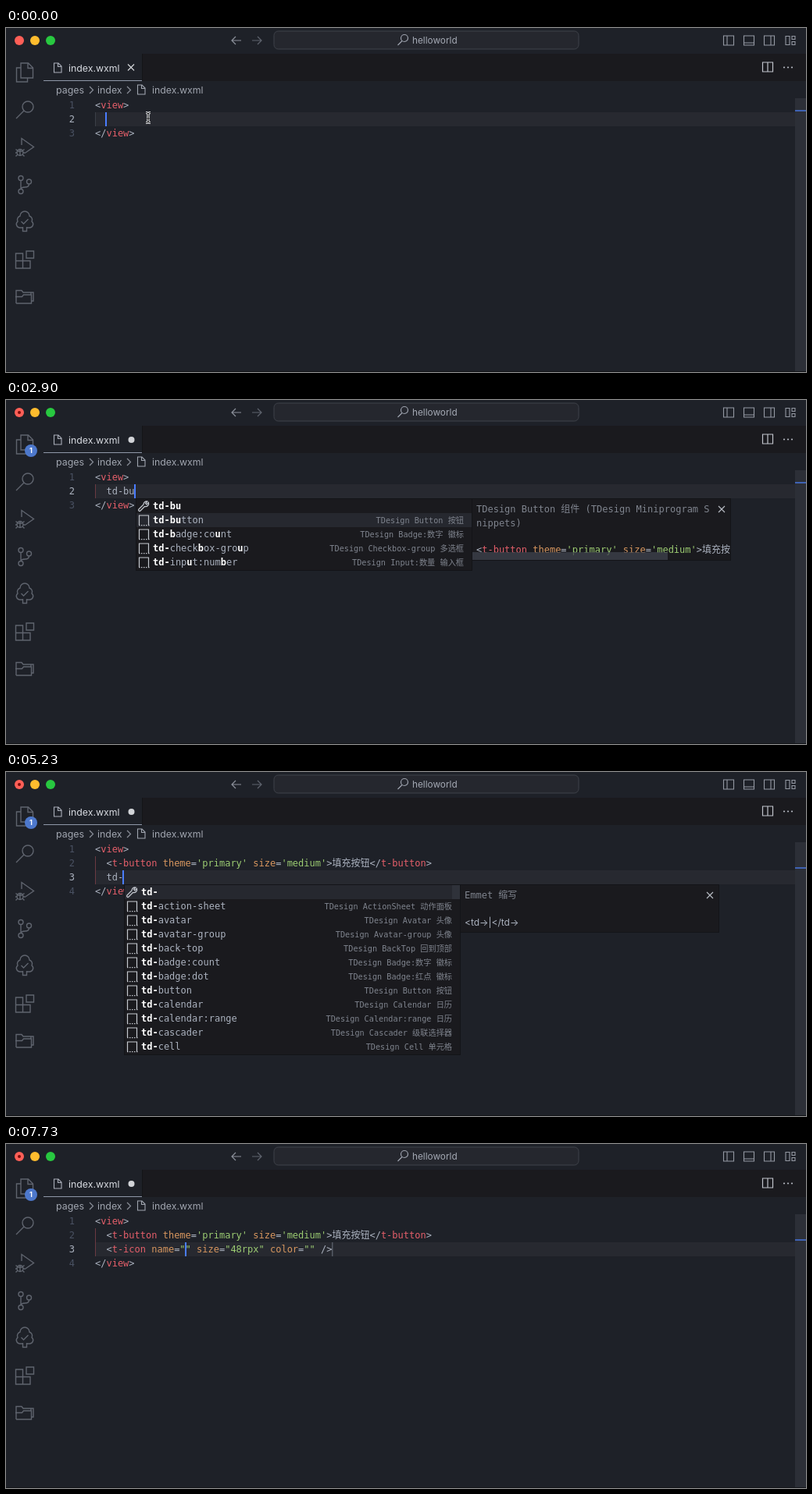
These frames come from a looping animation (1024 by 441 pixels, 7760 ms). An HTML page with a canvas:

```html
<!DOCTYPE html>
<html lang="en">
<head>
<meta charset="utf-8">
<title>Snippet completion</title>
<style>
  html, body { margin: 0; width: 100%; height: 100%; overflow: hidden; background: #1e2128; }
  canvas { display: block; }
</style>
</head>
<body>
<canvas id="stage" width="1024" height="441"></canvas>
<script>
const ctx = document.getElementById('stage').getContext('2d');
const LOOP = 7760, ROW = 18, LEFT = 114, TOP = 90;
const MONO = '"DejaVu Sans Mono", "Noto Sans CJK SC", "Noto Sans CJK", monospace';
const UI = 'Inter, "Noto Sans CJK SC", sans-serif';
const CODE = '12px ' + MONO;
const C = {
  bg: '#1e2128', dark: '#1a1a1e', line: '#272930', edge: '#131418', text: '#abb2bf', dim: '#7f848e',
  icon: '#5f646e', tag: '#e55f6a', attr: '#d8975f', string: '#9ccc72', cursor: '#4a7dff', blue: '#4d78cc'
};

// Completion rows: "label after td-|detail"; stars toggle the matched letters.
const ALL = ['action-sheet|ActionSheet 动作面板', 'avatar|Avatar 头像', 'avatar-group|Avatar-group 头像',
  'back-top|BackTop 回到顶部', 'badge:count|Badge:数字 徽标', 'badge:dot|Badge:红点 徽标', 'button|Button 按钮',
  'calendar|Calendar 日历', 'calendar:range|Calendar:range 日历', 'cascader|Cascader 级联选择器', 'cell|Cell 单元格'];
const notice = mark => ['|NoticeBar 公告栏', ':close|NoticeBar:close 公告栏', ':horizontal|NoticeBar:horizontal 公…',
  ':theme|NoticeBar:theme 公告栏', ':vertical|NoticeBar:vertical 公告栏'].map(s => mark + s);
const LISTS = {
  't': ALL, 'td': ALL, 'td-': ALL,
  'td-b': ['*b*ack-top|BackTop 回到顶部', '*b*adge:count|Badge:数字 徽标', '*b*adge:dot|Badge:红点 徽标',
    '*b*utton|Button 按钮', 'tab-*b*ar|TabBar 标签栏', 'side-*b*ar|SideBar 侧边栏', ...notice('notice-*b*ar')],
  'td-bu': ['*bu*tton|Button 按钮', '*b*adge:co*u*nt|Badge:数字 徽标',
    'check*b*ox-gro*u*p|Checkbox-group 多选框', 'inp*u*t:num*b*er|Input:数量 输入框'],
  'td-i': ['*i*con|Icon 图标', '*i*mage|Image 图片', '*i*mage-viewer|ImageViewer 图片预览', '*i*ndexes|Indexes 索引',
    '*i*nput|Input 输入框', '*i*nput:code|Input:验证码 输入框', '*i*nput:number|Input:数量 输入框',
    '*i*nput:price|Input:价格 输入框', 'p*i*cker|Picker 选择器', 's*i*de-bar|SideBar 侧边栏', 'st*i*cky|Sticky 吸顶'],
  'td-ic': ['*ic*on|Icon 图标', '*i*nput:*c*ode|Input:验证码 输入框', 'p*ic*ker|Picker 选择器', 'st*ic*ky|Sticky 吸顶',
    '*i*nput:pri*c*e|Input:价格 输入框', ...notice('not*ic*e-bar'), '*c*ell:sw*i*tch|Cell:switch 单元格']
};
const SLIDER = { 't': 18, 'td': 18, 'td-': 18, 'td-i': 54, 'td-ic': 77 };

const BUTTON = "<t-button theme='primary' size='medium'>填充按钮</t-button>";
const ICON = '<t-icon name="" size="48rpx" color="" />';
const DOCS = {
  'td-bu': ['TDesign Button 组件 (TDesign Miniprogram S', 'nippets)', BUTTON],
  'td-ic': ['TDesign Icon 组件 (TDesign Miniprogram Sni', 'ppets)', ICON]
};

// Each step: start time, body lines, typed word, selected row.
const steps = [
  [0, ['']],
  ...[[560, 't'], [860, 'td'], [1090, 'td-'], [1350, 'td-b'], [1850, 'td-bu']].map(([t, w]) => [t, [w], w, 0]),
  [2600, ['td-bu'], 'td-bu', 1],
  [3050, [BUTTON]],
  [3500, [BUTTON, '']],
  ...[[4600, 't'], [4850, 'td'], [5050, 'td-'], [5450, 'td-i'], [5690, 'td-ic']].map(([t, w]) => [t, [BUTTON, w], w, 0]),
  [6600, [BUTTON, 'td-ic'], 'td-ic', 1],
  [7350, [BUTTON, ICON]]
];

function rect(x, y, w, h, color) {
  ctx.fillStyle = color;
  ctx.fillRect(x, y, w, h);
}
function disc(x, y, r, color) {
  ctx.fillStyle = color;
  ctx.beginPath();
  ctx.arc(x, y, r, 0, 7);
  ctx.fill();
}
function text(s, x, y, color, font = CODE, align = 'left') {
  ctx.font = font;
  ctx.fillStyle = color;
  ctx.textAlign = align;
  ctx.fillText(s, x, y);
}
function width(s, font = CODE) {
  ctx.font = font;
  return ctx.measureText(s).width;
}
function icon(d, x, y, color = C.icon, w = 1.4) {
  ctx.save();
  ctx.translate(x, y);
  ctx.strokeStyle = color;
  ctx.lineWidth = w;
  ctx.stroke(new Path2D(d));
  ctx.restore();
}
const circle = (x, y, r) => `M${x + r} ${y}a${r} ${r} 0 1 1 ${-2 * r} 0a${r} ${r} 0 1 1 ${2 * r} 0`;

const CROSS = 'M-4 -4L4 4M4 -4L-4 4';
const FILE = 'M-4.5 -6h5.500l4 4v8h-9.500zM.5 -6v4.500h4.500';
const CHEVRON = 'M-2 -4.500L2.500 0L-2 4.500';
const FRAME = 'M-6.500 -6h13v12h-13z';
const WRENCH = 'M-6 4l6-6a4 4 0 0 1 5-4l-2.500 2.500 1.500 1.500 2.500-2.500a4 4 0 0 1-5 5l-5.500 5.500a1.400 1.400 0 0 1-2-2z';
const LENS = circle(2, -2, 4.5) + 'M-1 1.500L-6.500 7';
const IBEAM = 'M-3 -6.500q3 0 3 2v9q0 2 -3 2M3 -6.500q-3 0 -3 2M0 4.500q0 2 3 2M-2 1h4';
const ACTIVITY = [
  'M-5 -12h9.500l6 6v13h-15.500zM4 -12v6.500h6.500M-5 -6h-5.500v18h14v-5',
  circle(4, -4, 7) + 'M-1 1L-11 11',
  'M-4 -3v-8.500L11.500 -.5L0 7.500' + circle(-6, 6.5, 4) +
    'M-10 5h8M-6 3v7.500M-11.500 2.500l2.500 2M-.5 2.500l-2.500 2M-12 7h2M-2 7h2M-11.500 11.500l2.500 -2.500M-.5 11.500l-2.500 -2.500',
  circle(-5, -8.5, 3) + circle(5.5, -4, 3) + circle(-5, 8.5, 3) + 'M-5 -5.500v11M5.500 -1q0 4 -5 4q-5 0 -5.500 2.500',
  'M-3 7h-3a4.500 4.500 0 0 1 -3 -8a5 5 0 0 1 3 -7a6 6 0 0 1 12 0a5 5 0 0 1 3 7a4.500 4.500 0 0 1 -3 8h-3M-2.500 6v5.500h5v-5.500M-4.500 -1l3 3l6 -6',
  'M-11.500 -8h9v9.500h9.500v9.500h-18.500zM-11.500 1.500h9v9.500M2 -11h9.500v9h-9.500z',
  'M-11 8v-16.500h7l2 2.500h10v3M-11 8h19.500v-11h-10l-2 2.500h-8.500M8.500 5h2.500v-11h-3'
];

function drawCode(s, x, y) {
  let prev = '';
  for (const tok of s.match(/<\/?|\/?>|'[^']*'|"[^"]*"|[\w-]+|./g) || []) {
    const rest = s.slice(s.indexOf(tok) + tok.length);
    const color = /^['"]/.test(tok) ? C.string
      : prev[0] === '<' ? C.tag
      : /^\w/.test(tok) && rest[0] === '=' ? C.attr : C.text;
    text(tok, x, y, color);
    x += width(tok);
    prev = tok;
  }
}

function drawChrome(dirty) {
  rect(0, 0, 1024, 441, C.bg);
  ['#ff5f57', '#febc2e', '#28c840'].forEach((c, i) => disc(17 + 20 * i, 16, 6, c));
  if (dirty) disc(17, 16, 2, '#7c0d0a');
  icon('M6 0h-12M-1 -5l-5 5l5 5', 295, 16, '#8b909a', 1.2);
  icon('M-6 0h12M1 -5l5 5l-5 5', 321, 16, C.icon, 1.2);
  ctx.beginPath();
  ctx.roundRect(343, 4, 390, 23, 5.5);
  ctx.fillStyle = '#25272e';
  ctx.fill();
  ctx.strokeStyle = '#3f424a';
  ctx.lineWidth = 1;
  ctx.stroke();
  icon(LENS, 508, 15, '#9da2ad', 1.2);
  text('helloworld', 520, 20, '#a4a9b4', '11.8px ' + UI);
  icon(FRAME + 'M-2 -6v12', 925, 16, '#9499a3', 1.1);
  icon(FRAME + 'M-6.500 3h13', 951, 16, '#9499a3', 1.1);
  icon(FRAME + 'M2 -6v12', 977, 16, '#9499a3', 1.1);
  icon('M-6 -5.500h5v11h-5zM2 -5.500h4v4h-4zM2 1.500h4v4h-4z', 1004, 16, '#9499a3', 1.1);

  rect(48, 33, 976, 35, C.dark);
  rect(48, 33, 126, 35, C.bg);
  rect(174, 33, 1, 35, C.edge);
  rect(48, 67, 126, 1, '#8f98a8');
  icon(FILE, 66, 51, '#a9aeb8', 1.1);
  text('index.wxml', 80, 55.5, '#d7dae0', '12.3px ' + UI);
  if (dirty) disc(160.5, 51, 4, '#d2d4d8');
  else icon(CROSS, 160, 50.5, '#d2d4d8', 1.2);
  icon(FRAME + 'M0 -6v12', 975, 50, '#c0c4cc', 1.2);
  [-5, 0, 5].forEach(d => disc(1001 + d, 50.5, 1.1, '#b4b8c0'));

  const crumb = '12.4px ' + UI;
  text('pages', 64, 84, '#a0a5af', crumb);
  icon(CHEVRON, 109, 79.5, '#8b909a', 1.2);
  text('index', 117, 84, '#a0a5af', crumb);
  icon(CHEVRON, 157, 79.5, '#8b909a', 1.2);
  icon(FILE, 173, 79, '#a0a5af', 1.1);
  text('index.wxml', 187, 84, '#a0a5af', '12.3px ' + UI);

  ACTIVITY.forEach((d, i) => icon(d, 24, 57 + 48 * i));
  if (dirty) {
    disc(32, 65, 8, C.blue);
    text('1', 32, 68.3, '#fff', 'bold 9px ' + UI, 'center');
  }
  rect(0, 440, 1024, 1, C.edge);
}

function drawEditor(body, caretX, caretOn, typedAny) {
  const lines = ['<view>', ...body, '</view>'], row = body.length;
  const last = body[row - 1];
  rect(LEFT, TOP + ROW * row, 896, ROW, C.line);
  rect(LEFT, TOP + ROW, 1, ROW * row, typedAny && last ? '#6b3a42' : '#3b4048');
  lines.forEach((s, i) => {
    const y = TOP + ROW * i + 13, inner = i > 0 && i <= row;
    text(i + 1, 88, y, i === row ? C.text : '#495162', CODE, 'right');
    drawCode(s, LEFT + (inner ? width('  ') : 0), y);
  });
  if (last === ICON) rect(417, TOP + ROW * row, 1.5, ROW, '#555a64');
  if (caretOn) rect(Math.round(caretX) - 1, TOP + ROW * row, 2, ROW, C.cursor);
  rect(1010, TOP, 14, 350, '#2c2f37');
  rect(1010, row === 1 ? 105 : 122, 14, 2, '#3f63b4');
}

function box(x, y, w, h) {
  rect(x, y, w, h, C.edge);
  rect(x + 1, y + 1, w - 2, h - 2, C.dark);
}

function drawRow(label, detail, x, y, first) {
  if (first) icon(WRENCH, x + 10, y + 9, '#c5c9d0', 1.2);
  else {
    icon('M-6 6v-12h12v12', x + 10.5, y + 9, '#c5c9d0', 1.2);
    for (let i = 0; i < 5; i++) rect(x + 4 + i * 3, y + 15, 1.5, 1.2, '#c5c9d0');
  }
  let tx = x + 22;
  label.split('*').forEach((part, i) => {
    const font = i % 2 ? 'bold ' + CODE : CODE;
    text(part, tx, y + 13, i % 2 ? '#fff' : C.text, font);
    tx += width(part, font);
  });
  if (detail) {
    const right = x + 420 - (detail.endsWith('…') ? 8 : 0);
    text('TDesign ' + detail, right, y + 12.5, C.dim, '10.2px ' + MONO, 'right');
  }
}

function drawPopup(word, selected, x, y) {
  const rows = LISTS[word];
  box(x, y, 431, ROW * (rows.length + 1) + 3);
  rect(x + 1, y + 1 + ROW * selected, 429, ROW, '#26282f');
  drawRow(`*${word}*`, '', x, y + 1, true);
  rows.forEach((r, i) => {
    const [rest, detail] = r.split('|');
    const label = `*${word.slice(0, 3)}*${'td-'.slice(word.length)}${rest}`;
    drawRow(label, detail, x, y + 1 + ROW * (i + 1));
  });
  if (SLIDER[word]) rect(x + 420, y + 1, 10, SLIDER[word], '#2f323a');

  const px = x + 430, tx = x + 436;
  box(px, y, 332, selected ? 80 : 62);
  if (selected) {
    const [a, b, code] = DOCS[word];
    text(a, tx, y + 18, C.dim);
    text(b, tx, y + 36, C.dim);
    ctx.save();
    ctx.beginPath();
    ctx.rect(px, y, 331, 79);
    ctx.clip();
    drawCode(code, tx, y + 70);
    ctx.restore();
    if (code === BUTTON) rect(px + 1, y + 69, 250, 10, 'rgba(62, 66, 76, .75)');
  } else {
    text('Emmet 缩写', tx, y + 18, C.dim);
    text(`<${word}>|</${word}>`, tx, y + 53, C.text, '12px ' + UI);
  }
  icon(CROSS, x + 750, y + 14, '#b9bdc5', 1.1);
}

function draw(now) {
  const t = now % LOOP;
  const current = steps.filter(s => s[0] <= t).pop();
  const [at, body, word, selected] = current;
  const last = body[body.length - 1];
  // Moving through the list does not restart the caret blink.
  const blinkFrom = selected ? steps.find(s => s[2] === word)[0] : at;
  const caretOn = (t - blinkFrom) % 1000 < 500;
  const before = last === ICON ? ICON.slice(0, 14) : last;
  const caretX = LEFT + width('  ' + before);

  drawChrome(at > 0);
  drawEditor(body, caretX, caretOn, at > 0);
  if (word) drawPopup(word, selected, Math.round(caretX) + 1, TOP + ROW * (body.length + 1));
  if (at === 0) {
    icon(IBEAM, 182, 115, '#e4e6ea', 3.2);
    icon(IBEAM, 182, 115, '#111', 1);
  }
}

const start = performance.now();
function tick() {
  draw(performance.now() - start);
  requestAnimationFrame(tick);
}
tick();
</script>
</body>
</html>
```
